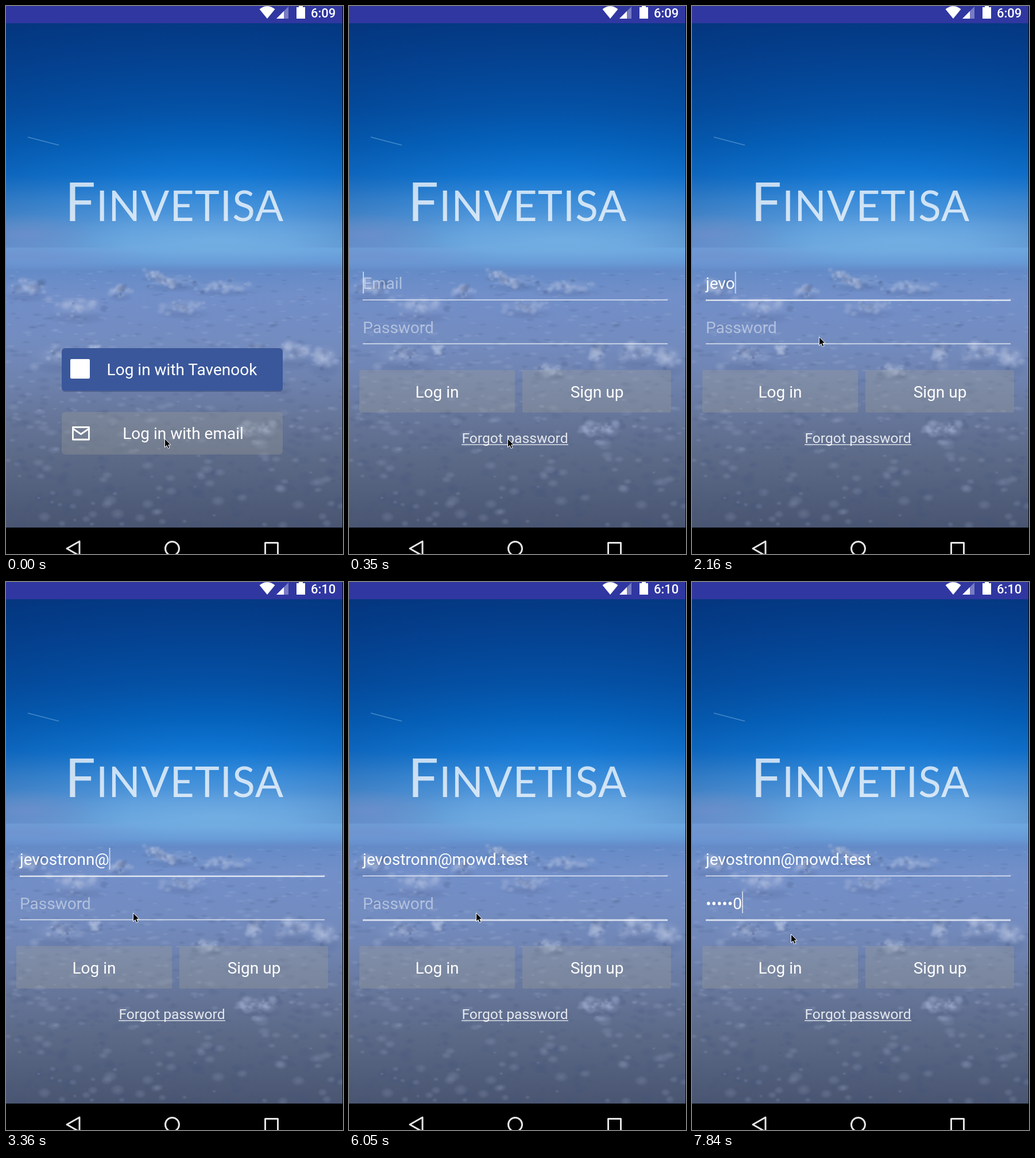
An HTML page that plays this animation: 587x953 px, repeating every 7.99 s.

```html
<!DOCTYPE html>
<html lang="en">
<head>
<meta charset="utf-8">
<title>Login screen</title>
<style>
  html, body { margin: 0; width: 100%; height: 100%; overflow: hidden; background: #000; }
  svg { display: block; width: 587px; height: 953px; }
  text { font: 28px Roboto, sans-serif; fill: #fff; }
  .mid { text-anchor: middle; }
  .title { font: 73px Lato, sans-serif; fill: #fff; fill-opacity: .75; letter-spacing: 1px; text-anchor: middle; }
  .title .cap { font-size: 94px; }
  .hint { fill-opacity: .45; }
  .link { font-size: 24.7px; fill-opacity: .83; }
  .clock { font-size: 22px; font-weight: 500; }
  .soft { fill: #a4a497; fill-opacity: .3; }
  .rule { fill: #fff; fill-opacity: .74; }
  .caret { fill: #fff; fill-opacity: .6; }
  .icon { fill: none; stroke: #e4e4e4; stroke-width: 3; stroke-linejoin: round; }
</style>
</head>
<body>
<svg viewBox="0 0 587 953">
  <defs>
    <linearGradient id="air" gradientUnits="userSpaceOnUse" x1="0" y1="30" x2="0" y2="907">
      <stop offset="0" stop-color="#043f8d"/>
      <stop offset=".08" stop-color="#04499c"/>
      <stop offset=".17" stop-color="#0456ad"/>
      <stop offset=".24" stop-color="#0566c1"/>
      <stop offset=".3" stop-color="#1076d2"/>
      <stop offset=".35" stop-color="#3a8cd9"/>
      <stop offset=".4" stop-color="#5a9bdb"/>
      <stop offset=".45" stop-color="#69a3dc"/>
      <stop offset=".475" stop-color="#6699d6"/>
      <stop offset=".49" stop-color="#648bc7"/>
      <stop offset=".54" stop-color="#728fc9"/>
      <stop offset=".63" stop-color="#738cc0"/>
      <stop offset=".71" stop-color="#6e82ae"/>
      <stop offset=".78" stop-color="#66769a"/>
      <stop offset=".86" stop-color="#5c6a88"/>
      <stop offset=".94" stop-color="#515e7b"/>
      <stop offset="1" stop-color="#495571"/>
    </linearGradient>
    <radialGradient id="shade" gradientUnits="userSpaceOnUse" cx="350" cy="420" r="530">
      <stop offset=".25" stop-color="#04205c" stop-opacity="0"/>
      <stop offset="1" stop-color="#04205c" stop-opacity=".3"/>
    </radialGradient>
    <radialGradient id="light">
      <stop offset="0" stop-color="#b9c6e2" stop-opacity=".7"/>
      <stop offset=".55" stop-color="#a9b8da" stop-opacity=".45"/>
      <stop offset="1" stop-color="#a0b0d4" stop-opacity="0"/>
    </radialGradient>
    <radialGradient id="dark">
      <stop offset="0" stop-color="#3c4f7c" stop-opacity=".6"/>
      <stop offset=".6" stop-color="#3c4f7c" stop-opacity=".35"/>
      <stop offset="1" stop-color="#3c4f7c" stop-opacity="0"/>
    </radialGradient>
    <radialGradient id="haze">
      <stop offset="0" stop-color="#88c2ec" stop-opacity=".4"/>
      <stop offset="1" stop-color="#88c2ec" stop-opacity="0"/>
    </radialGradient>
    <radialGradient id="mauve">
      <stop offset="0" stop-color="#7390cb" stop-opacity=".7"/>
      <stop offset="1" stop-color="#7390cb" stop-opacity="0"/>
    </radialGradient>
    <clipPath id="view"><rect y="30" width="586" height="877"/></clipPath>

    <g id="scene">
      <g clip-path="url(#view)">
        <rect y="30" width="586" height="877" fill="url(#air)"/>
        <rect y="30" width="586" height="390" fill="url(#shade)"/>
        <ellipse cx="370" cy="408" rx="320" ry="50" fill="url(#haze)"/>
        <ellipse cx="30" cy="398" rx="135" ry="36" fill="url(#mauve)"/>
        <ellipse cx="30" cy="435" rx="230" ry="26" fill="url(#mauve)"/>
        <path d="M38 228L92 242" stroke="#6fa9dd" stroke-opacity=".6" stroke-width="1.3"/>
        <g id="clouds"></g>
      </g>
      <rect y="907" width="587" height="46"/>
      <text class="title" x="293.5" y="374"><tspan class="cap">F</tspan>INVETISA</text>
    </g>
  </defs>

  <rect width="586" height="60" fill="#3037a1"/>

  <g id="form">
    <use href="#scene"/>
    <text id="hint1" class="hint" x="24" y="492">Email</text>
    <text id="mail" x="24" y="492"></text>
    <rect id="rule1" class="rule" x="24" y="510.4" width="531" height="1.6"/>
    <text id="hint2" class="hint" x="24" y="568.5">Password</text>
    <text id="pass" x="24" y="568.5"></text>
    <rect id="rule2" class="rule" x="24" y="586.6" width="531" height="1.6"/>
    <rect id="caret" class="caret" width="2" height="38"/>
    <rect class="soft" x="18" y="633" width="271" height="74" rx="2"/>
    <rect class="soft" x="302" y="633" width="259" height="74" rx="2"/>
    <text class="mid" x="153.5" y="681">Log in</text>
    <text class="mid" x="432" y="681">Sign up</text>
    <text class="mid link" x="289" y="760">Forgot password</text>
    <rect class="rule" x="196" y="762" width="186" height="1.5"/>
  </g>

  <g id="start">
    <use href="#scene"/>
    <rect x="97" y="597" width="385" height="74" rx="6" fill="#1d2f5e" fill-opacity=".35"/>
    <rect x="97" y="595" width="385" height="74" rx="6" fill="#3a579b"/>
    <rect x="112" y="614" width="34" height="34" rx="2" fill="#fff"/>
    <text class="mid" x="306.5" y="642">Log in with Tavenook</text>
    <rect class="soft" x="97" y="706" width="385" height="74" rx="6"/>
    <path d="M116.5 732.5h28v21.5h-28zM116.5 735l14 9.5 14-9.5" fill="none" stroke="#fff" stroke-width="2.8" stroke-linejoin="round"/>
    <text class="mid" x="308.5" y="753">Log in with email</text>
  </g>

  <g fill="#fff">
    <path d="M455 22L441.5 5.5Q455 -5 468.5 5.5Z"/>
    <path d="M471 22L492 1V22Z" fill-opacity=".35"/>
    <path d="M471 22L484 9V22Z"/>
    <path d="M506 2h4v-3h7v3h4v20h-15z"/>
    <text id="clock" class="clock" x="531" y="20"></text>
  </g>
  <g class="icon">
    <path d="M106 943.5L128 931V956Z"/>
    <circle cx="289.5" cy="943.5" r="12"/>
    <rect x="451.5" y="933.5" width="22" height="22"/>
  </g>
  <rect x="586" width="1" height="953"/>
  <path id="pointer" d="M.5 .5V15.5L4 12.2 6.3 17.5 9 16.3 6.7 11.2H11Z" fill="#000" stroke="#fff" stroke-width="1"/>
</svg>

<script>
const $ = id => document.getElementById(id);
const LOOP = 7990;

// Cloud field: fine seeded mottling, darker and coarser towards the viewer, then brighter puffs.
let seed = 11;
const rnd = () => (seed = (seed * 16807) % 2147483647) / 2147483647;
const spread = r => (rnd() + rnd() - 1) * r;
let field = '';
const blob = (x, y, rx, ry, tone, alpha) => {
  field += `<ellipse cx="${x.toFixed(1)}" cy="${y.toFixed(1)}" rx="${rx.toFixed(1)}" ry="${ry.toFixed(1)}" fill="url(#${tone})" opacity="${alpha}"/>`;
};
for (let i = 0; i < 800; i++) {
  const near = rnd(), size = 3 + (2 + near * 8) * rnd();
  blob(rnd() * 586, 462 + near * 445, size * (1.8 - near * .7), size * (.5 + near * .4), rnd() < .4 + near * .3 ? 'dark' : 'light', .26);
}
// Centre, half width and half height of each puff.
const puffs = [
  [35, 490, 42, 16], [125, 524, 52, 18], [200, 495, 20, 12], [255, 466, 20, 9],
  [290, 478, 50, 12], [380, 487, 60, 12], [95, 608, 50, 20], [155, 595, 12, 10],
  [430, 606, 14, 20], [500, 602, 38, 20], [350, 632, 32, 13], [310, 522, 45, 14],
  [555, 610, 30, 22], [440, 735, 40, 14]
];
for (const [x, y, w, h] of puffs) {
  blob(x, y + h, w * 1.1, h * .7, 'dark', .3);
  blob(x, y, w, h, 'light', .35);
  for (let i = 0; i < 22; i++) {
    const dx = spread(w), size = 2.5 + rnd() * h * .45;
    blob(x + dx, y + spread(h), size * 1.2, size, rnd() < .25 ? 'dark' : 'light', .45);
  }
}
$('clouds').innerHTML = field;

// Each step changes only the named values.
const mail = 'jevostronn@mowd.test';
const dots = n => ({ pass: '•'.repeat(n) + '0', caret: 2 });
const typed = n => ({ mail: mail.slice(0, n), caret: 1 });
const steps = [
  [0, { view: 'start', mail: '', pass: '', caret: 1, thick1: false, thick2: false, at: [276, 752], clock: '6:09' }],
  [150, { view: 'fade' }],
  [350, { view: 'form' }],
  [710, { at: [265, 715] }],
  [860, { at: [236, 622] }],
  [1010, { at: [221, 575] }],
  [1150, { thick1: true }],
  [1600, { caret: 0 }],
  [1720, typed(1)],
  [2160, typed(4)],
  [2460, typed(5)],
  [2610, typed(8)],
  [2760, typed(10)],
  [3360, { ...typed(11), clock: '6:10' }],
  [3810, { caret: 0 }],
  [3960, typed(12)],
  [4260, typed(13)],
  [4410, typed(15)],
  [4560, typed(18)],
  [4710, typed(20)],
  [5310, { caret: 0 }],
  [5460, { thick2: true }],
  [5600, { caret: 2 }],
  [5900, { thick1: false }],
  [6050, { caret: 0 }],
  [6340, dots(0)],
  [6640, dots(1)],
  [6940, dots(2)],
  [7090, dots(3)],
  [7390, dots(4)],
  [7540, dots(5)],
  [7840, { at: [172, 612] }]
];

const set = (id, name, value) => $(id).setAttribute(name, value);
const show = (id, on) => set(id, 'visibility', on ? 'visible' : 'hidden');

function draw(s) {
  const fade = s.view === 'fade';
  show('start', s.view !== 'form');
  set('start', 'opacity', fade ? .14 : 1);
  set('form', 'transform', `translate(0 ${fade ? 23 : 0})`);
  $('mail').textContent = s.mail;
  $('pass').textContent = s.pass;
  show('hint1', !s.mail);
  show('hint2', !s.pass);
  set('rule1', 'height', s.thick1 ? 2.6 : 1.6);
  set('rule2', 'height', s.thick2 ? 2.8 : 1.6);
  show('caret', s.caret);
  const input = $(s.caret === 2 ? 'pass' : 'mail');
  set('caret', 'x', 24 + (input.textContent ? input.getComputedTextLength() : 0));
  set('caret', 'y', s.caret === 2 ? 538 : 462);
  $('clock').textContent = s.clock;
  set('pointer', 'transform', `translate(${s.at})`);
}

let last = -1;
function tick() {
  const t = performance.now() % LOOP;
  const now = steps.filter(([start]) => start <= t);
  if (now.length !== last) {
    last = now.length;
    draw(Object.assign({}, ...now.map(([, change]) => change)));
  }
  requestAnimationFrame(tick);
}
tick();
</script>
</body>
</html>
```
